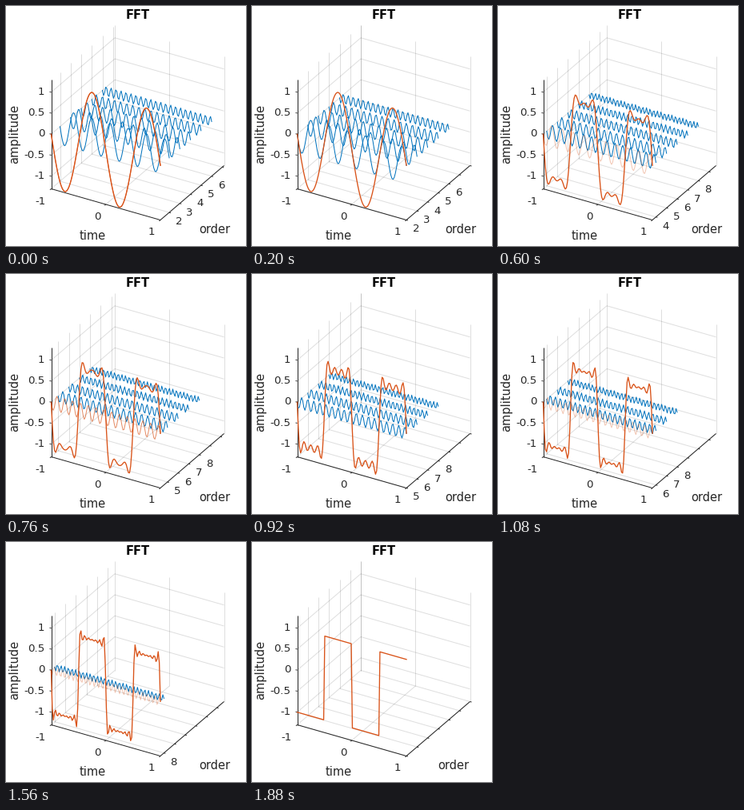
A matplotlib script that plays this animation: 300 px wide and 300 px high, repeating every 1.92 s.

```python
import numpy as np
import matplotlib.pyplot as plt
from matplotlib.animation import FuncAnimation
from matplotlib.collections import LineCollection

SIZE, FRAMES, STEPS, ORDERS = 300, 48, 6, 8
PX = 0.72  # points per pixel at 100 dpi
BLUE, ORANGE, INK = "#0072BD", "#D95319", "#262626"
DEPTH, ZMAX = 6, 1.3

plt.rcParams["font.family"] = "DejaVu Sans"
plt.rcParams["path.simplify"] = False

fig = plt.figure(figsize=(SIZE / 100, SIZE / 100), dpi=100, facecolor="white")
ax = fig.add_axes([0, 0, 1, 1])
ax.set_xlim(-0.5, SIZE - 0.5)
ax.set_ylim(SIZE - 0.5, -0.5)
ax.axis("off")

# Stage vectors of the three axes, in pixels
ORIGIN = np.array([56.0, 228.0])
TIME = np.array([136.5, 39.0])
ORDER = np.array([79.5, -68.0])
AMP = np.array([0.0, -136.5])


def project(t, d, z):
    """Time, distance behind the front plane and amplitude to pixels."""
    t, d, z = np.broadcast_arrays(t, d, z)
    return (ORIGIN + np.multiply.outer((t + 1) / 2, TIME)
            + np.multiply.outer(d / DEPTH, ORDER)
            + np.multiply.outer((z + ZMAX) / (2 * ZMAX), AMP))


def tick(p, direction, length=2.0):
    return [p, p + length * direction / np.hypot(*direction)]


def label(x, y, text, size=13.33, **kw):
    kw = {"ha": "center", "va": "baseline", "color": INK, **kw}
    return ax.text(x, y, text, fontsize=size * PX, **kw)


def lines(color, alpha, z):
    return ax.add_collection(
        LineCollection([], colors=color, alpha=alpha, linewidths=PX, zorder=z))


def curve(color, z, width=1.0):
    return ax.plot([], [], color=color, lw=width * PX, zorder=z,
                   solid_joinstyle="round")[0]


t = np.linspace(-1, 1, 100)
waves = [-4 / np.pi * np.sin(2 * np.pi * m * t) / m
         for m in range(1, 2 * ORDERS, 2)]
square = np.sign(-np.sin(2 * np.pi * t))
partial = list(np.cumsum(waves[:-1], axis=0)) + [square]

grid = lines(INK, 0.15, 1)
axes = lines(INK, 1, 2)
blue = [curve(BLUE, 20 - n) for n in range(ORDERS)]
fading = curve(ORANGE, 21)
total = curve(ORANGE, 22, 1.33)

fixed_grid = []
for x in (-1, 0, 1):
    fixed_grid += [project(x, [0, DEPTH], -ZMAX),
                   project(x, DEPTH, [-ZMAX, ZMAX])]
for z in np.arange(-1, 1.1, 0.5):
    fixed_grid += [project([-1, 1], DEPTH, z), project(-1, [0, DEPTH], z)]

fixed_axes = [project([-1, 1], 0, -ZMAX), project(1, [0, DEPTH], -ZMAX),
              project(-1, 0, [-ZMAX, ZMAX])]
for x in (-1, 0, 1):
    p = project(x, 0, -ZMAX)
    fixed_axes.append(tick(p, -ORDER))
    label(p[0] - 6.5, p[1] + 19, f"{x}", ha="right")
for z in np.arange(-1, 1.1, 0.5):
    p = project(-1, 0, z)
    fixed_axes.append(tick(p, -TIME))
    label(p[0] - 8, p[1] + 3, f"{z:g}", ha="right")

label(164, 15, "FFT", 14.67, weight="bold", color="black")
label(108, 292, "time", 14.67)
label(14.5, 159, "amplitude", 14.67, rotation=90, rotation_mode="anchor")
order_name = label(260.5, 284, "order", 14.67)
order_labels = [label(0, 0, str(n + 1)) for n in range(ORDERS)]


def put(line, d, z):
    line.set_data(*project(t, d, z).T)


def update(k):
    stage, i = divmod(k, STEPS)
    mix = (i + 1) / STEPS
    front = 1 + stage + mix

    grid_now, axes_now = list(fixed_grid), list(fixed_axes)
    first = int(np.ceil(front - 1e-6))
    last = int(np.floor(front + DEPTH + 1e-6))
    for n in range(first, last + 1):
        d = n - front
        grid_now += [project(-1, d, [-ZMAX, ZMAX]), project([-1, 1], d, -ZMAX)]
        axes_now.append(tick(project(1, d, -ZMAX), TIME))
    grid.set_segments(grid_now)
    axes.set_segments(axes_now)

    for n in range(ORDERS):
        shown = stage < n <= stage + 5
        blue[n].set_visible(shown)
        order_labels[n].set_visible(shown)
        if shown:
            d = n + 1 - front
            put(blue[n], d, waves[n])
            order_labels[n].set_position(project(1, d, -ZMAX) + [12.3, 15])

    put(fading, 0, waves[stage])
    fading.set_alpha(max(0.0, 1 - mix))
    before = partial[max(stage - 1, 0)]
    put(total, 0, before + mix * (partial[stage] - before))
    order_name.set_x(260.5 if stage < ORDERS - 1 else 251.5)
    return []


anim = FuncAnimation(fig, update, frames=FRAMES, interval=40,
                     repeat=True, repeat_delay=0, blit=False)
plt.show()
```
